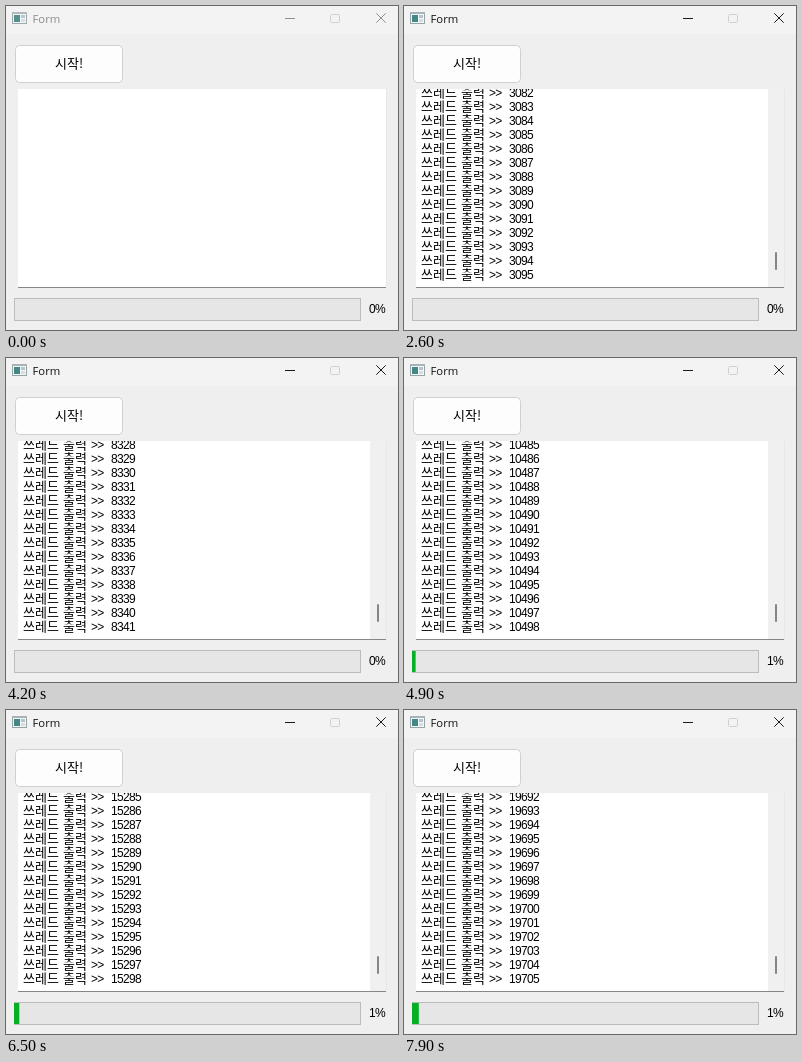
An HTML page for the animation above (8 s loop, 392 by 324 pixels).

```html
<!DOCTYPE html>
<html lang="ko">
<head>
<meta charset="utf-8">
<title>Form</title>
<style>
  html, body { margin: 0; width: 100%; height: 100%; overflow: hidden; background: #efefef; }
  svg { display: block; width: 392px; height: 324px; }
  text { white-space: pre; fill: #000; }
  .ko { font: 13px "Noto Sans CJK KR", "Noto Sans CJK", "Noto Sans CJK JP", sans-serif; }
  .num { font: 12px "Liberation Sans", Arial, sans-serif; letter-spacing: -.67px; }
  .title { font: 11.3px "Open Sans", "Noto Sans", sans-serif; }
</style>
</head>
<body>
<svg viewBox="0 0 392 324">
  <defs><clipPath id="view"><rect x="12" y="83" width="352" height="198"/></clipPath></defs>
  <rect width="392" height="324" fill="#efefef"/>
  <rect width="392" height="28" fill="#f3f3f3"/>

  <g id="icon">
    <rect x="6.5" y="6.5" width="14" height="11" fill="#f4f7f7" stroke="#98a3a6"/>
    <rect x="6" y="6" width="15" height="2" fill="#a9b3b6"/>
    <rect x="8" y="9" width="6" height="7" fill="#438886"/>
    <rect x="15" y="9" width="4" height="3" fill="#b4c4cb"/>
    <rect x="15" y="13" width="4" height="3" fill="#d5dddf"/>
  </g>
  <text id="title" class="title" x="26.5" y="17">Form</text>
  <g id="controls" fill="none">
    <path d="M279 12.5h10"/>
    <path d="M370.3 7.3l9.4 9.4M379.7 7.3l-9.4 9.4"/>
  </g>
  <rect x="324.5" y="8.5" width="9" height="8" rx="1" fill="none" stroke="#cfcfcf"/>

  <rect id="button" x="9.5" y="39.5" width="107" height="37" rx="4"/>
  <text class="ko" x="49" y="62">시작!</text>

  <rect x="12" y="83" width="368" height="198" fill="#fff"/>
  <g id="log" clip-path="url(#view)"></g>
  <g id="scroll">
    <rect x="364" y="83" width="16" height="198" fill="#f0f0f0"/>
    <rect x="371" y="246" width="2" height="18" rx="1" fill="#868686"/>
  </g>
  <path d="M12 281.5h368" stroke="#868686"/>
  <path d="M380.5 83v198" stroke="#e8e8e8"/>

  <rect x="8.5" y="292.5" width="346" height="22" fill="#e6e6e6" stroke="#bcbcbc"/>
  <rect id="bar" x="8" y="293" height="21" fill="#06b025"/>
  <text class="num" y="307"><tspan id="percent" x="363"></tspan><tspan x="369">%</tspan></text>

  <path id="cursor" d="M.5 .5V16.5L4.2 13L7 19.3L9.7 18.1L7 12H12Z" fill="#fff" stroke="#000" stroke-width="1"/>
</svg>
<script>
const LOOP = 8000, STEP = 100, ROWS = 14, TOTAL = 1e6;
const CLICK = 1600, LEAVE = 2100;
const counts = [[1600, 0], [2600, 3095], [4200, 8341], [5600, 12655], [6500, 15298], [7900, 19705]];
const cursorX = [[800, 1], [900, 20], [1000, 36], [1200, 54], [1900, 54], [2000, 34]];
const cursorY = [[800, 51], [900, 54], [1200, 57], [2000, 57]];

const $ = id => document.getElementById(id);

function lerpKeys(keys, t) {
  if (t <= keys[0][0]) return keys[0][1];
  for (let i = 1; i < keys.length; i++) {
    const [t0, a] = keys[i - 1], [t1, b] = keys[i];
    if (t <= t1) return a + (b - a) * (t - t0) / (t1 - t0);
  }
  return keys[keys.length - 1][1];
}

function addText(parent, cls, x, y, content = "") {
  const el = document.createElementNS("http://www.w3.org/2000/svg", "text");
  el.setAttribute("class", cls);
  el.setAttribute("x", x);
  el.setAttribute("y", y);
  el.textContent = content;
  parent.appendChild(el);
  return el;
}

const numbers = Array.from({ length: ROWS }, (_, i) => {
  const y = 273 - (ROWS - 1 - i) * 14;
  addText($("log"), "ko", 17, y, "쓰레드");
  addText($("log"), "ko", 57, y, "출력");
  addText($("log"), "num", 85, y, ">>");
  return addText($("log"), "num", 105, y);
});

function buttonLook(t, hover) {
  if (!hover) return ["#fdfdfd", "#d0d0d0"];
  return t === CLICK ? ["#cce4f7", "#1a6cae"] : ["#e3eff9", "#2f86c1"];
}

function render(time) {
  const t = Math.floor(time / STEP) * STEP;
  const count = Math.round(lerpKeys(counts, t));
  const active = t >= CLICK, running = count > 0;

  $("title").style.fill = active ? "#111" : "#8c8c8c";
  $("controls").setAttribute("stroke", active ? "#1a1a1a" : "#8f8f8f");
  $("icon").setAttribute("opacity", active ? 1 : .9);

  const x = lerpKeys(cursorX, t), y = lerpKeys(cursorY, t);
  const shown = t >= 800 && t < LEAVE;
  $("cursor").setAttribute("transform", `translate(${x} ${y})`);
  $("cursor").setAttribute("visibility", shown ? "visible" : "hidden");

  const [fill, stroke] = buttonLook(t, shown && x > 9);
  $("button").setAttribute("fill", fill);
  $("button").setAttribute("stroke", stroke);

  for (const id of ["log", "scroll"]) $(id).setAttribute("visibility", running ? "visible" : "hidden");
  numbers.forEach((el, i) => { el.textContent = count - ROWS + 1 + i; });

  const percent = Math.floor(count / TOTAL * 100);
  $("percent").textContent = percent;
  $("bar").setAttribute("width", percent ? 346 * count / TOTAL : 0);
}

const start = performance.now();
function frame() {
  render((performance.now() - start) % LOOP);
  requestAnimationFrame(frame);
}
frame();
</script>
</body>
</html>
```
